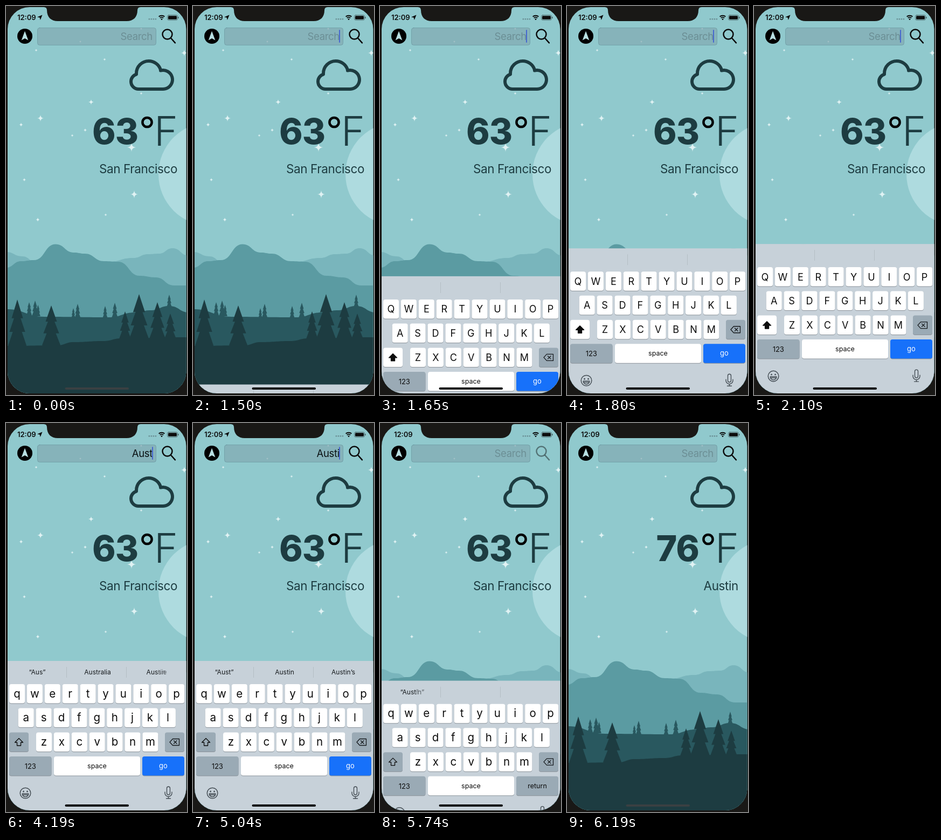
Animation, 336 px wide and 721 px high, one loop 6290 ms. Source, as an HTML page with a canvas:

```html
<!DOCTYPE html>
<html lang="en">
<head>
<meta charset="utf-8">
<title>Weather search</title>
<style>
html, body { margin: 0; width: 100%; height: 100%; overflow: hidden; background: #191816; }
canvas { display: block; width: 336px; height: 721px; }
</style>
</head>
<body>
<canvas id="stage"></canvas>
<script>
const W = 336, H = 721, LOOP = 6290;
const canvas = document.getElementById('stage');
const ctx = canvas.getContext('2d');
const ratio = window.devicePixelRatio || 1;
canvas.width = W * ratio;
canvas.height = H * ratio;

const BEZEL = '#191816', SKY = '#90c9cd', INK = '#1d3c41', MID = '#29585f';
const GRAY_KEY = '#9aaab5', BOARD = '#c7d1d9';
const TAU = Math.PI * 2;

// Typed text by start time
const typing = [[0, ''], [3090, 'A'], [3440, 'Au'], [3740, 'Aus'], [4140, 'Aust'],
  [4640, 'Austi'], [5140, 'Austin'], [5640, '']];

// Word suggestions by start time
const hints = [
  [0, ['', '', '']],
  [3140, ['“A”', 'And', 'All']],
  [3520, ['“Au”', 'August', 'Aunt']],
  [3840, ['“Aus”', 'Australia', 'Aussie']],
  [4110, ['“Aus”', 'Australia', 'Austin']],
  [4320, ['“Aust”', 'Australia', 'Austin']],
  [4740, ['“Aust”', 'Austin', 'Austin’s']],
  [5240, ['“Aust”', 'Austin', '']],
  [5400, ['“Aust”', '', '']],
  [5640, ['“Austin”', '', '']]
];

const stars = [[158, 178, 5], [64, 208, 6], [28, 220, 4], [147, 230, 3.5], [123, 240, 2.5],
  [34, 322, 3.5], [59, 396, 4], [185, 387, 2.5], [238, 349, 7], [233, 262, 8],
  [183, 99, 2.5], [56, 82, 2.5], [138, 66, 2], [251, 42, 2], [251, 162, 2.5], [331, 87, 6]];

const clamp = v => Math.min(1, Math.max(0, v));
const ramp = (t, from, to) => clamp((t - from) / (to - from));
const spring = ms => { const x = Math.max(0, ms) * 0.0165; return 1 - (1 + x) * Math.exp(-x); };
const indexAt = (list, t) => list.findLastIndex(e => t >= e[0]);

function text(str, x, y, size, color, { weight = 400, align = 'left', gap = 0 } = {}) {
  ctx.font = `${weight} ${size}px Inter, "Open Sans", sans-serif`;
  ctx.letterSpacing = gap + 'px';
  ctx.textAlign = align;
  ctx.fillStyle = color;
  ctx.fillText(str, x, y);
}

function box(x, y, w, h, r, color) {
  ctx.fillStyle = color;
  ctx.beginPath();
  ctx.roundRect(x, y, w, h, r);
  ctx.fill();
}

function disc(x, y, r, color) {
  ctx.fillStyle = color;
  ctx.beginPath();
  ctx.arc(x, y, r, 0, TAU);
  ctx.fill();
}

function poly(pts) {
  ctx.beginPath();
  pts.forEach(([x, y]) => ctx.lineTo(x, y));
  ctx.closePath();
}

function shape(pts, color) {
  poly(pts);
  ctx.fillStyle = color;
  ctx.fill();
}

function pen(color, width) {
  ctx.strokeStyle = color;
  ctx.lineWidth = width;
  ctx.lineCap = ctx.lineJoin = 'round';
}

function line(...pts) {
  ctx.beginPath();
  pts.forEach(([x, y]) => ctx.lineTo(x, y));
  ctx.stroke();
}

function ring(x, y, r, from = 0, to = TAU) {
  ctx.beginPath();
  ctx.arc(x, y, r, from, to);
  ctx.stroke();
}

// Rolling ridge, level at every point
function hill(pts, color) {
  ctx.beginPath();
  ctx.moveTo(0, H);
  ctx.lineTo(...pts[0]);
  for (let i = 1; i < pts.length; i++) {
    const [x0, y0] = pts[i - 1], [x1, y1] = pts[i], m = (x0 + x1) / 2;
    ctx.bezierCurveTo(m, y0, m, y1, x1, y1);
  }
  ctx.lineTo(W + 4, H);
  ctx.fillStyle = color;
  ctx.fill();
}

function tree(x, top, base, half, color) {
  const side = [[0, 0], [0.62, 0.4], [0.36, 0.4], [0.86, 0.69], [0.5, 0.69], [1, 0.98], [0.9, 1]];
  const at = s => ([dx, dy]) => [x + s * dx * half, top + dy * (base - top)];
  shape([...side.map(at(1)), ...side.map(at(-1)).reverse()], color);
}

function star([x, y, r]) {
  ctx.beginPath();
  ctx.moveTo(x, y - r);
  for (let i = 1; i <= 4; i++) {
    const a = i * TAU / 4;
    ctx.quadraticCurveTo(x + 0.1 * r * Math.sin(a - TAU / 8), y - 0.1 * r * Math.cos(a - TAU / 8),
      x + r * Math.sin(a), y - r * Math.cos(a));
  }
  ctx.fillStyle = '#e0f2f3';
  ctx.fill();
}

function landscape() {
  ctx.fillStyle = SKY;
  ctx.fillRect(0, 0, W, H);
  disc(379, 311.5, 96, '#aedbdf');
  stars.forEach(star);
  hill([[0, 456], [30, 464], [60, 478], [190, 474], [236, 467], [264, 460], [284, 459],
    [309, 449], [340, 463]], '#79b5bc');
  hill([[0, 485], [28, 473], [52, 471], [92, 441.5], [126, 457], [146, 459], [182, 473],
    [208, 474], [248, 500], [278, 503], [312, 518], [340, 518]], '#5b9ba2');
  hill([[0, 562], [72, 576], [190, 577], [240, 568], [268, 564], [303, 556], [340, 568]], MID);
  [[43, 549, 573], [54, 546, 575], [59.5, 554, 575], [125, 560, 578], [133, 552, 578],
    [184, 556, 578], [202, 550, 578], [303, 535, 558]]
    .forEach(([x, top, base]) => tree(x, top, base, (base - top) * 0.2, MID));
  hill([[0, 630], [95, 629], [125, 623], [180, 621], [215, 616], [340, 614]], INK);
  [[21, 544, 631, 17], [84, 555, 630, 17], [221, 566, 618, 11], [247, 534, 618, 18],
    [281, 549, 618, 15], [305, 570, 618, 11]].forEach(p => tree(...p, INK));
}

function cloud() {
  pen(INK, 6);
  ctx.beginPath();
  ctx.arc(246, 140, 14, TAU / 4, TAU * 0.705);
  ctx.arc(265, 125, 23, Math.PI, TAU - 0.32);
  ctx.arc(291.5, 136.5, 17.5, -1.83, TAU / 4);
  ctx.closePath();
  ctx.stroke();
}

function weather(t) {
  const done = t >= 6040;
  cloud();
  text(done ? '76' : '63', 245, 256, 66, INK, { weight: 800, align: 'right', gap: -1 });
  pen('#000', 4.5);
  ring(262, 215.5, 8.6);
  text('F', 275, 259, 75, INK, { weight: 300 });
  text(done ? 'Austin' : 'San Francisco', 318, 310, 22.5, INK, { align: 'right', gap: -0.4 });
}

function caretAlpha(t) {
  if (t < 1500 || t >= 5640) return 0;
  if (t >= 2200 && t < 2490) return ramp(t, 2360, 2490);
  return 1;
}

function searchBar(t) {
  box(58.5, 40.5, 220, 32, 4, 'rgba(126,157,167,0.5)');
  pen('rgba(70,110,120,0.35)', 1);
  ctx.stroke();
  const typed = typing[indexAt(typing, t)][1];
  text(typed || 'Search', 272, 63, 18.5, typed ? '#0b1214' : '#6c8f95', { align: 'right', gap: -0.3 });
  ctx.globalAlpha = caretAlpha(t);
  box(271, 44, 2, 24, 1, '#4668cf');
  ctx.globalAlpha = 1;

  disc(35, 56, 14, '#000');
  shape([[35, 46.5], [41.3, 63.5], [35, 60], [28.7, 63.5]], '#b9dfe2');

  ctx.globalAlpha = t >= 5670 ? 0.3 + 0.7 * ramp(t, 5680, 5980) : 1;
  pen('#0a0a0a', 2.5);
  ring(299.5, 52.5, 9);
  line([306.5, 60], [314, 68.3]);
  ctx.globalAlpha = 1;
}

function statusBar(t) {
  const located = t < 5290;
  text('12:09', located ? 21 : 26, 26, 13, '#0c0c0c', { weight: 600 });
  if (located) shape([[67.5, 16.5], [63.7, 26], [62.6, 21.6], [58, 20.4]], '#0c0c0c');
  for (let i = 0; i < 4; i++) box(264.5 + i * 4, 23, 2.8, 2.5, 1, '#6b9196');
  pen('#0c0c0c', 2);
  ctx.lineCap = 'butt';
  [4.6, 7.8].forEach(r => ring(289, 25.5, r, -TAU * 0.37, -TAU * 0.13));
  disc(289, 24.6, 1.4, '#0c0c0c');
  pen('#41595c', 0.8);
  ctx.beginPath();
  ctx.roundRect(299.6, 16.8, 18.8, 9.4, 2.6);
  ctx.stroke();
  box(301, 18.2, 16, 6.6, 1.5, '#0c0c0c');
  box(319.2, 19.8, 1.3, 3.4, 0.6, '#41595c');
}

function key(x, y, w, fill, label = '', size = 13, color = '#0c0c0c', drop = 5) {
  box(x, y + 1, w, 35.5, 4, '#8a9299');
  box(x, y, w, 35.5, 4, fill);
  text(label, x + w / 2, y + 18 + drop, size, color, { align: 'center' });
}

function keyRow(letters, x, y, upper) {
  [...letters].forEach((c, i) => key(x + i * 32.9, y, 29, '#fff',
    upper ? c.toUpperCase() : c, upper ? 18 : 20.5, '#0c0c0c', 6.5));
}

// Shared opening letters stay solid while the endings cross-fade
function hint(from, to, x, y, mix) {
  const draw = (str, left, alpha) => {
    ctx.globalAlpha = alpha;
    text(str, left, y, 12, '#15191c');
  };
  let n = 0;
  while (n < from.length && from[n] === to[n]) n++;
  ctx.font = '400 12px Inter, "Open Sans", sans-serif';
  ctx.letterSpacing = '0px';
  const width = s => ctx.measureText(s).width;
  const stem = to.slice(0, n);
  const left = n ? x - (width(from) * (1 - mix) + width(to) * mix) / 2 : 0;
  const end = left + width(stem);
  const fromX = n ? end : x - width(from) / 2, toX = n ? end : x - width(to) / 2;
  draw(stem, left, 1);
  draw(from.slice(n), fromX, 1 - mix);
  draw(to.slice(n), toX, mix);
  ctx.globalAlpha = 1;
}

function hintBar(t, top) {
  [112, 223].forEach(x => box(x, top + 11, 1, 20, 0, '#b4bec5'));
  const i = indexAt(hints, t), [start, words] = hints[i];
  const old = hints[Math.max(0, i - 1)][1], mix = ramp(t, start, start + 160);
  words.forEach((w, c) => hint(old[c], w, [58, 170, 279][c], top + 25, mix));
}

function shiftIcon(y, solid) {
  poly([[24, y - 7], [31.5, y + 0.5], [27.5, y + 0.5], [27.5, y + 6.5],
    [20.5, y + 6.5], [20.5, y + 0.5], [16.5, y + 0.5]]);
  pen('#0c0c0c', 1.3);
  ctx.stroke();
  ctx.fillStyle = '#0c0c0c';
  if (solid) ctx.fill();
}

function deleteIcon(y) {
  pen('#15191c', 1.3);
  poly([[304, y], [309.5, y - 6], [321.5, y - 6], [321.5, y + 6], [309.5, y + 6]]);
  ctx.stroke();
  line([311.5, y - 2.7], [317, y + 2.7]);
  line([317, y - 2.7], [311.5, y + 2.7]);
}

function faceIcon(x, y) {
  pen('#454e55', 1.5);
  ring(x, y, 9.8);
  disc(x - 3.5, y - 3, 1.4, '#454e55');
  disc(x + 3.5, y - 3, 1.4, '#454e55');
  ctx.beginPath();
  ctx.arc(x, y + 1, 5.8, 0, Math.PI);
  ctx.closePath();
  ctx.stroke();
  line([x - 5, y + 3.2], [x + 5, y + 3.2]);
}

function micIcon(x, y) {
  pen('#454e55', 1.4);
  ctx.beginPath();
  ctx.roundRect(x - 3, y - 11, 6, 15, 3);
  ctx.stroke();
  ctx.beginPath();
  ctx.moveTo(x - 6.5, y - 1);
  ctx.arc(x, y + 1, 6.5, Math.PI, 0, true);
  ctx.lineTo(x + 6.5, y - 1);
  ctx.stroke();
  line([x, y + 7.5], [x, y + 11]);
  line([x - 4, y + 11], [x + 4, y + 11]);
}

function keyboard(t, top) {
  const upper = t < 3090, idle = t >= 5640;
  ctx.fillStyle = BOARD;
  ctx.fillRect(0, top, W, H);
  hintBar(t, top);
  keyRow('qwertyuiop', 6, top + 43, upper);
  keyRow('asdfghjkl', 22.7, top + 87.5, upper);
  keyRow('zxcvbnm', 56, top + 132.5, upper);
  key(6, top + 132.5, 36, upper ? '#fff' : GRAY_KEY);
  shiftIcon(top + 150.5, upper);
  key(295, top + 132.5, 36, GRAY_KEY);
  deleteIcon(top + 150.5);
  key(6, top + 177, 78.5, GRAY_KEY, '123');
  key(89, top + 177, 160, '#fff', 'space', 12.5, '#0c0c0c', 4);
  if (idle) key(253, top + 177, 78, GRAY_KEY, 'return', 12.5, '#0c0c0c', 4);
  else key(253, top + 177, 78, '#1771fa', 'go', 13, '#fff', 4);
  faceIcon(36, top + 245);
  micIcon(301.5, top + 244);
}

function notch() {
  ctx.beginPath();
  ctx.moveTo(70, 0);
  ctx.lineTo(70, 2);
  ctx.quadraticCurveTo(76, 2, 76, 8);
  ctx.bezierCurveTo(76, 21, 84, 28, 96, 28);
  ctx.lineTo(224, 28);
  ctx.bezierCurveTo(236, 28, 244, 21, 244, 8);
  ctx.quadraticCurveTo(244, 2, 250, 2);
  ctx.lineTo(250, 0);
  ctx.fillStyle = BEZEL;
  ctx.fill();
}

function draw(t) {
  ctx.setTransform(ratio, 0, 0, ratio, 0, 0);
  ctx.fillStyle = BEZEL;
  ctx.fillRect(0, 0, W, H);
  ctx.save();
  ctx.beginPath();
  ctx.roundRect(3, 2, 331.5, 716, 41);
  ctx.clip();
  landscape();
  weather(t);
  searchBar(t);
  statusBar(t);
  const open = t < 1500 ? 0 : spring(t - 1475) - spring(t - 5703);
  if (open > 0.003) keyboard(t, H - 280 * open);
  const dim = t < 1500 ? 1 : ramp(t, 5990, 6150);
  box(109.5, 707, 118.5, 4, 2, `rgb(${58 * dim},${64 * dim},${66 * dim})`);
  ctx.restore();
  notch();
}

const begin = performance.now();
function tick() {
  draw((performance.now() - begin) % LOOP);
  requestAnimationFrame(tick);
}
tick();
</script>
</body>
</html>
```
